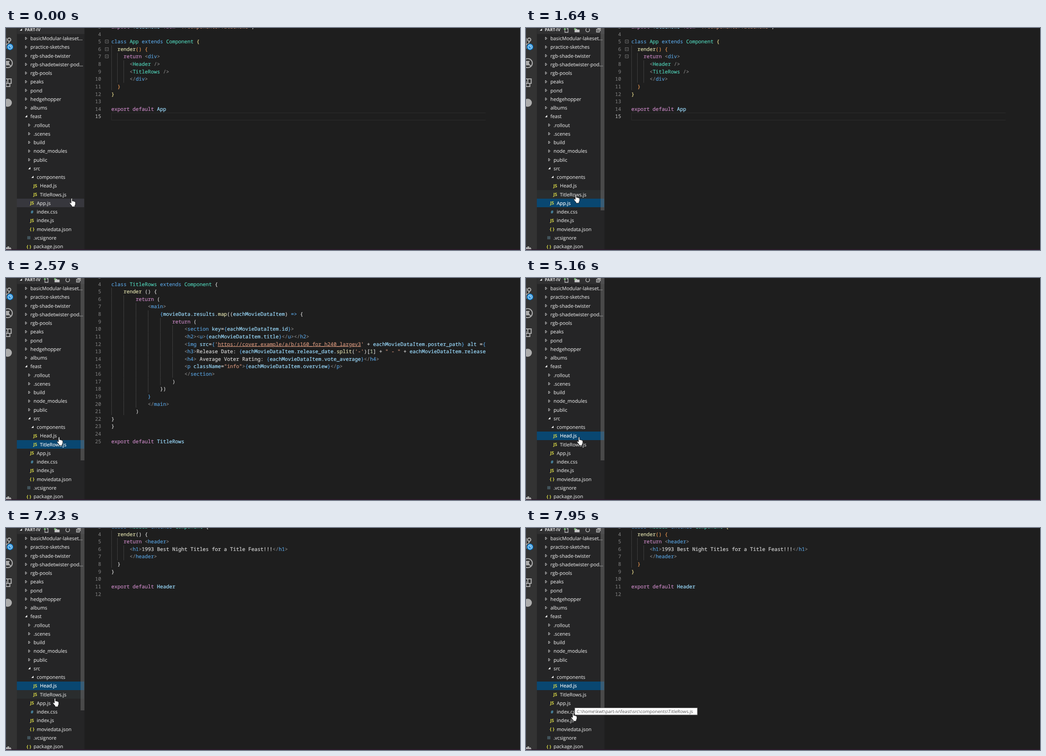
Animation of 1137x493 px, one loop 8000 ms. Source, as an HTML page:

```html
<!DOCTYPE html>
<html lang="en">
<head>
<meta charset="utf-8">
<title>Code editor</title>
<style>
  html, body { margin: 0; width: 100%; height: 100%; overflow: hidden; background: #1e1e1e; }
  svg { display: block; }
  text { white-space: pre; text-rendering: geometricPrecision; }
  #tree text { font: 10.8px "Open Sans", "Noto Sans", sans-serif; fill: #dcdcdc; stroke: #dcdcdc; stroke-width: .15; }
  #tree .icon { font-weight: 700; font-size: 9.8px; text-anchor: middle; stroke: none; }
  #tree .title { font-weight: 700; font-size: 9.2px; stroke: none; }
  #tree .picked { fill: #fff; stroke: #fff; }
  #tip text { font: 10px "Open Sans", "Noto Sans", sans-serif; fill: #575757; }
  .code { font: 11.225px "Noto Sans Mono", "DejaVu Sans Mono", monospace; }
  .code tspan { fill: currentColor; stroke: currentColor; stroke-width: .22; }
  .num { text-anchor: end; fill: #858585; }
  .num.on { fill: #c6c6c6; }
  .k { color: #c586c0; } .b { color: #569cd6; } .t { color: #4ec9b0; }
  .f { color: #dcdcaa; } .g { color: #808080; } .v { color: #9cdcfe; }
  .s, .u { color: #ce9178; } .u { text-decoration: underline; }
  .w { color: #d4d4d4; } .n { color: #b5cea8; } .y { color: #e6d88c; } .o { color: #e0924f; }
</style>
</head>
<body>
<svg id="stage" width="1137" height="493" viewBox="0 0 1137 493">
  <defs>
    <clipPath id="side"><rect x="24" width="149" height="493"/></clipPath>
    <clipPath id="page"><rect x="173" width="888" height="493"/></clipPath>
  </defs>
  <rect width="1137" height="493" fill="#1e1e1e"/>
  <g id="editor" clip-path="url(#page)"></g>
  <rect x="1136" width="1" height="493" fill="#141414"/>

  <rect width="24.5" height="493" fill="#333"/>
  <g fill="none" stroke="#adadad" stroke-width="2.2">
    <circle cx="7" cy="26" r="3.6"/>
    <path d="M7 30q0 5-7 7M0 22v24"/>
    <circle cx="4" cy="78" r="10"/>
    <path d="M-3 71L11 85M0 74h8M0 82h7"/>
    <path d="M0 113h11.500v10H4v-10M0 130h8.500v-7H0M0 118v12"/>
  </g>
  <ellipse cx="3.500" cy="78" rx="3.500" ry="5" fill="#adadad"/>
  <circle cx="4" cy="166" r="9" fill="#adadad"/>
  <circle cx="9" cy="42" r="8.200" fill="#333"/>
  <circle cx="9" cy="42" r="7.200" fill="#0a7fd4"/>
  <g fill="none" stroke="#fff" stroke-width="1.300"><circle cx="9" cy="42" r="4.400"/><path d="M9 39v3.200h2.600"/></g>
  <path d="M0 487h3v-2h4v3l3-1 2 4v2H0z" fill="#adadad"/>

  <rect x="24.5" width="149" height="493" fill="#252526"/>
  <rect x="24.5" width="149" height="13.4" fill="#303031"/>
  <g id="tree" clip-path="url(#side)">
    <rect id="hover" x="24" width="150" height="19" fill="#2a2d2e"/>
    <rect id="pick" x="24" width="150" height="19"/>
    <path d="M35.5 1v5h-5z" fill="#e8e8e8"/>
    <text class="title" x="41.5" y="6.7">PART-IV</text>
  </g>
  <g id="tools">
    <g fill="none" stroke="#c5c5c5" stroke-width="1.3">
      <path d="M86 3v6.5h7V1.500h-3"/>
      <path d="M139.5 1.500A4.200 4.200 0 1 1 134 1"/>
      <path d="M156 3h6.500v6H156zM158 1h6.500v6M157.500 6h3.500"/>
    </g>
    <path d="M107.5 2h5l1 1.500h5V9.500h-11z" fill="#c5c5c5"/>
    <path d="M83.5 2.500h5M86 0v5M106 2.500h5M108.500 0v5" stroke="#89d185" stroke-width="1.6"/>
    <rect x="165" width="8.5" height="405" fill="#797979" opacity=".42"/>
  </g>
  <rect y="491.3" width="1137" height="2" fill="#2d1b2d"/>

  <g id="tip">
    <rect x="108" y="399.5" width="271" height="15.5" fill="#fff" stroke="#767676"/>
    <text x="112" y="411"></text>
  </g>
  <path id="hand" fill="#fff" stroke="#111" stroke-width=".9" stroke-linejoin="round"
    d="M4 1.800Q5.300.2 6.600 1.800V7.300Q8 6.300 8.900 7.700Q10.300 7 11.200 8.500Q13.600 8 13.700 10.500V14.500L12.200 17.500V20H5.500V18L1 12.500Q.2 10.600 1.900 10.300L4 12z"/>
  <g id="arrow">
    <circle cx="12" cy="1.5" r="5.3" fill="none" stroke="#1b86dc" stroke-width="3.4"/>
    <path d="M0 0V15L3.500 11.800L5.800 17L8.200 16L5.900 11H10.500z" fill="#fff" stroke="#111" stroke-width=".7"/>
  </g>
</svg>
<script>
const $ = id => document.getElementById(id);

function add(parent, tag, attrs, text) {
  const el = document.createElementNS(parent.namespaceURI, tag);
  for (const name in attrs) el.setAttribute(name, attrs[name]);
  if (text) el.textContent = text;
  return parent.appendChild(el);
}

// File tree: depth, kind (c closed, o open, j js, h css, d json, x other), label
const ROW = 19.25;
const files = [
  [0, 'c', 'basicModular-lakeset…'], [0, 'c', 'practice-sketches'], [0, 'c', 'rgb-shade-twister'],
  [0, 'c', 'rgb-shadetwister-pod…'], [0, 'c', 'rgb-pools'], [0, 'c', 'peaks'], [0, 'c', 'pond'],
  [0, 'c', 'hedgehopper'], [0, 'c', 'albums'], [0, 'o', 'feast'], [1, 'c', '.rollout'],
  [1, 'c', '.scenes'], [1, 'c', 'build'], [1, 'c', 'node_modules'], [1, 'c', 'public'],
  [1, 'o', 'src'], [2, 'o', 'components'], [3, 'j', 'Head.js'], [3, 'j', 'TitleRows.js'],
  [2, 'j', 'App.js'], [2, 'h', 'index.css'], [2, 'j', 'index.js'], [2, 'd', 'moviedata.json'],
  [1, 'x', '.vcsignore'], [1, 'd', 'package.json']
];
const HEAD = 17, LIST = 18, APP = 19;
const icons = { j: ['JS', '#d6d645'], h: ['#', '#519aba'], d: ['{ }', '#d6d645'] };
const rowTop = i => Math.round(13.4 + ROW * i);

const labels = files.map(([depth, kind, name], i) => {
  const x = 54 + 7 * depth, y = 23 + ROW * i, tree = $('tree');
  if (kind === 'c') {
    add(tree, 'path', { d: `M${x - 11} ${y - 3}l3.4 3l-3.4 3z`, fill: 'none', stroke: '#dcdcdc' });
  } else if (kind === 'o') {
    add(tree, 'path', { d: `M${x - 7} ${y - 3}v5h-5z`, fill: '#f0f0f0' });
  } else if (kind === 'x') {
    add(tree, 'rect', { x: x - 14, y: y - 3.5, width: 7, height: 7, fill: '#41535b' });
  } else {
    const [glyph, color] = icons[kind];
    add(tree, 'text', { class: 'icon', x: x - 10.3, y: y + 3.7, style: `fill:${color}` }, glyph);
  }
  return add(tree, 'text', { x, y: y + 4 }, name);
});

// Code: indent, then segments split by "|", each led by its colour class
const CHAR = 6.735, LINE = 16.625, LEFT = 233;
const lineY = n => 13.6 + LINE * (n - 4);

const appCode = [
  "kimport |vTitleRows |kfrom |s'./components/TitleRows'|w;",
  '',
  'bclass |tApp |bextends |tComponent |y{',
  '  frender|o() {',
  '    kreturn |g<|bdiv|g>',
  '      g<|tHeader |g/>',
  '      g<|tTitleRows |g/>',
  '      g</|bdiv|g>',
  '  o}',
  'y}',
  '',
  'kexport default |vApp',
  ''
];
const listCode = [
  '',
  'bclass |tTitleRows |bextends |tComponent |w{',
  '    frender |w() {',
  '        kreturn |w(',
  '            g<|bmain|g>',
  '                b{|vmovieData.results.|fmap|w((|veachMovieDataItem|w) |b=> |w{',
  '                    kreturn |w(',
  '                        g<|bsection |vkey|w=|b{|veachMovieDataItem.id|b}|g>',
  '                        g<|bh2|g><|bu|g>|b{|veachMovieDataItem.title|b}|g</|bu|g></|bh2|g>',
  "                        g<|bimg |vsrc|w=|b{|s'|uhttps:|u//cover.example/a/b/s160_for_h240_largev3|s'|w + |veachMovieDataItem.poster_path|b} |valt |w=|b{",
  "                        g<|bh3|g>|wRelease Date: |b{|veachMovieDataItem.release_date.|fsplit|w(|s'-'|w)[|n1|w] + |s\" - \"|w + |veachMovieDataItem.release_date",
  '                        g<|bh4|g>|w Average Voter Rating: |b{|veachMovieDataItem.vote_average|b}|g</|bh4|g>',
  '                        g<|bp |vclassName|w=|s"info"|g>|b{|veachMovieDataItem.overview|b}|g</|bp|g>',
  '                        g</|bsection|g>',
  '                    w)',
  '                w})',
  '            b}',
  '            g</|bmain|g>',
  '        w)',
  'w}',
  'w}',
  '',
  'kexport default |vTitleRows'
];
const headCode = (outer, inner) => [
  `bclass |tHeader |bextends |tComponent |${outer}{`,
  `  frender|${inner}() {`,
  '    kreturn |g<|bheader|g>',
  '      g<|bh1|g>|w1993 Best Night Titles for a Title Feast!!!|g</|bh1|g>',
  '      g</|bheader|g>',
  `  ${inner}}`,
  `${outer}}`,
  '',
  'kexport default |vHeader',
  ''
];

function pane(lines, tab, active) {
  const g = add($('editor'), 'g', { class: 'code' });
  lines.forEach((line, i) => {
    const n = i + 3, y = lineY(n), indent = line.search(/\S|$/);
    add(g, 'text', { class: n === active ? 'num on' : 'num', x: 210.5, y: y + 4 }, String(n));
    for (let col = 0; col < indent; col += tab) {
      add(g, 'rect', { x: Math.round(LEFT + col * CHAR), y: y - LINE / 2, width: 1, height: LINE, fill: '#404040' });
    }
    const row = add(g, 'text', { x: LEFT + indent * CHAR, y: y + 4 });
    for (const part of line.trimStart().split('|')) {
      if (part) add(row, 'tspan', { class: part[0] }, part.slice(1));
    }
  });
  return g;
}

const panes = {
  app: pane(appCode, 2, 15),
  list: pane(listCode, 4),
  plain: pane(headCode('w', 'w'), 2),
  head: pane(headCode('y', 'o'), 2)
};
for (const n of [5, 6, 7]) {
  const y = Math.round(lineY(n));
  add(panes.app, 'path', { d: `M219.5 ${y - 3.5}h7v7h-7zM221 ${y}h4`, fill: 'none', stroke: '#707070' });
}
add(panes.app, 'rect', { x: 233.5, y: 188.5, width: 840, height: 16, fill: 'none', stroke: '#2c2c2c' });
$('tip').lastElementChild.textContent = String.raw`C:\home\kwt\part-iv\feast\src\components\TitleRows.js`;

// Each step changes only what it names
const steps = [
  [0, { x: 140, y: 377, pick: APP, focus: false, hover: -1, pane: 'app', tools: false, tip: false, busy: false }],
  [380, { x: 108, y: 378 }],
  [1010, { x: 108, y: 372.5, busy: true, focus: true, hover: LIST, tools: true }],
  [1640, { x: 105, y: 369, busy: false }],
  [1780, { pick: LIST, hover: -1 }],
  [1900, { x: 112, y: 352 }],
  [2020, { pane: '' }],
  [2570, { pane: 'list' }],
  [5160, { pick: HEAD, pane: '' }],
  [5290, { pane: 'plain' }],
  [5580, { x: 111, y: 353 }],
  [5710, { x: 109, y: 354 }],
  [6410, { x: 109, y: 355 }],
  [6540, { x: 108, y: 355 }],
  [6690, { x: 108, y: 356 }],
  [6830, { x: 105, y: 366, hover: LIST }],
  [6960, { x: 103, y: 376 }],
  [7230, { x: 103, y: 377 }],
  [7350, { tip: true }],
  [7500, { x: 100, y: 392 }],
  [7650, { x: 99, y: 393 }],
  [7800, { x: 98, y: 394 }],
  [7950, { x: 99, y: 409, hover: -1, pane: 'head' }]
];
let last = {};
const states = steps.map(([at, change]) => (last = { ...last, ...change, at }));

const show = (el, on) => { el.style.display = on ? '' : 'none'; };

function render(s) {
  for (const name in panes) show(panes[name], name === s.pane);
  show($('tools'), s.tools);
  show($('tip'), s.tip);
  show($('hover'), s.hover >= 0);
  show($('hand'), !s.busy);
  show($('arrow'), s.busy);
  $(s.busy ? 'arrow' : 'hand').setAttribute('transform', `translate(${s.x} ${s.y})`);
  $('hover').setAttribute('y', rowTop(s.hover));
  $('pick').setAttribute('y', rowTop(s.pick));
  $('pick').setAttribute('fill', s.focus ? '#094771' : '#37373d');
  labels.forEach((label, i) => label.classList.toggle('picked', s.focus && i === s.pick));
}

const start = performance.now();
let current;
function tick() {
  const t = (performance.now() - start) % 8000;
  const next = states.findLast(s => s.at <= t);
  if (next !== current) render(current = next);
  requestAnimationFrame(tick);
}
tick();
</script>
</body>
</html>
```
